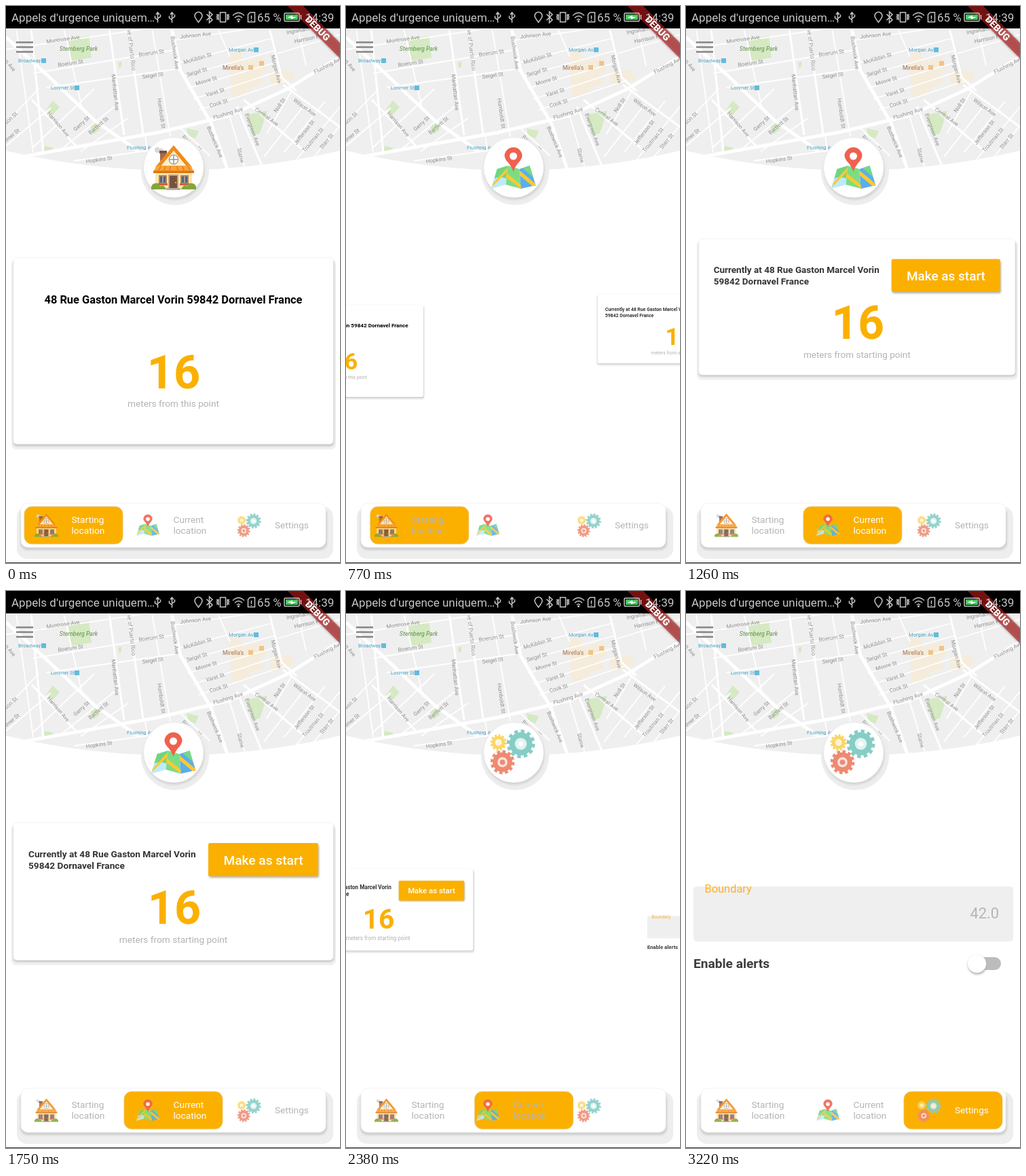
Recreate the animation shown at these times as an HTML page. Size 492 by 820 pixels, loop 3.29 s.

```html
<!DOCTYPE html>
<html lang="en">
<head>
<meta charset="utf-8">
<title>Distance tracker</title>
<style>
@property --page { syntax: "<number>"; inherits: true; initial-value: 0; }
@property --tab { syntax: "<number>"; inherits: true; initial-value: 0; }
@property --sel { syntax: "<number>"; inherits: true; initial-value: 0; }

html, body { margin: 0; width: 100%; height: 100%; overflow: hidden; background: #fff; }
svg.stage {
  display: block; width: 492px; height: 820px;
  font-family: Roboto, "Noto Sans", sans-serif;
  --amber: #fbb000;
  animation: page 3290ms infinite, tab 3290ms infinite, sel 3290ms step-end infinite;
}
@keyframes page {
  0% { --page: 0; }
  17.75% { --page: 0; animation-timing-function: cubic-bezier(.333, .9, .667, 1); }
  42.3% { --page: 1; }
  68.05% { --page: 1; animation-timing-function: cubic-bezier(.333, .9, .667, 1); }
  92.6%, 100% { --page: 2; }
}
@keyframes tab {
  0% { --tab: 0; }
  20.1% { --tab: 0; animation-timing-function: ease-in-out; }
  39.5% { --tab: 1; }
  67.95% { --tab: 1; animation-timing-function: ease-in-out; }
  87.4%, 100% { --tab: 2; }
}
@keyframes sel {
  0% { --sel: 0; }
  17.75% { --sel: 1; }
  68.05%, 100% { --sel: 2; }
}

/* Pages slide by a full width and shrink with their distance from the centre */
.page {
  --d: calc(var(--i) - var(--page));
  transform-origin: 246px 508px;
  transform: translateX(calc(var(--d) * 492px)) scale(max(0, 1 - max(var(--d), -1 * var(--d))));
}
.hero, .label {
  --s: calc(var(--i) - var(--sel));
  --on: max(0, 1 - max(var(--s), -1 * var(--s)));
}
.hero { opacity: var(--on); }
.label {
  --c: calc(180 + 75 * var(--on));
  fill: rgb(var(--c), var(--c), var(--c));
  font-size: 13.67px;
}
.pill { transform: translateX(calc(var(--tab) * 147px)); }

.amber { fill: var(--amber); }
.mid { text-anchor: middle; }
.bold { font-weight: 700; }
.big { font-size: 68.35px; font-weight: 700; fill: var(--amber); text-anchor: middle; }
.note { font-size: 13.67px; fill: #b2b2b2; text-anchor: middle; }
.icon { opacity: .87; }
.line { fill: none; stroke: #c6c6c6; stroke-width: 1.5; }
.road { fill: none; stroke: #fff; stroke-linejoin: round; }
#streets { font-size: 8px; fill: #8f8f8f; text-anchor: middle; }
.stop { font-size: 7.6px; fill: #45a3c4; }
</style>
</head>
<body>
<svg class="stage" viewBox="0 0 492 820">
  <defs>
    <filter id="soft" x="-10%" y="-10%" width="120%" height="130%"><feGaussianBlur stdDeviation="1.6"/></filter>
    <clipPath id="dome"><path d="M0 33H492V213Q246 271 0 213Z"/></clipPath>

    <symbol id="house" viewBox="0 0 66 66">
      <path d="M5 5q5-5 7 0q6-2 6 4q-3 5-8 2q-6 0-5-6" fill="#d5d8da"/>
      <path d="M13 9h9v20h-9z" fill="#a5694f"/>
      <path d="M12 8h11v4H12z" fill="#7d5240"/>
      <path d="M6 40h54v24H6z" fill="#fbe6ad"/>
      <path d="M33 3L55 32H11Z" fill="#fdf1cf"/>
      <path d="M33 0L60 32H53L33 8L13 32H6Z" fill="#f28a18"/>
      <circle cx="33" cy="21" r="7.5" fill="#c9a27d"/>
      <circle cx="33" cy="21" r="6" fill="#fff"/>
      <path d="M33 14v14M26 21h14" stroke="#8b9aa5" stroke-width="1.5"/>
      <path d="M8 30H58L63 39H3Z" fill="#f9a43a"/>
      <path d="M3 37.500H63V41H3Z" fill="#df7412"/>
      <path d="M14 31l-3 6m10-6l-2 6m9-6l-1 6m11-6l1 6m7-6l2 6m6-6l3 6" stroke="#e47e16" stroke-width="1.500"/>
      <path d="M25 43h15v22H25z" fill="#caa374"/>
      <path d="M27 45h11v20H27z" fill="#76533f"/>
      <circle cx="36" cy="55" r="1" fill="#f5cc62"/>
      <path d="M11 44h12v13H11zM43 44h12v13H43z" fill="#b98256"/>
      <path d="M13 46h8v9h-8zM45 46h8v9h-8z" fill="#536378"/>
      <path d="M17 46v9M49 46v9" stroke="#e9ddc1"/>
      <path d="M10 56h14v3H10zM42 56h14v3H42z" fill="#d65d41"/>
      <path d="M0 65q-1-8 6-9q5-1 7 4q6-3 9 5zM66 65q1-8-6-9q-5-1-7 4q-6-3-9 5z" fill="#83a637"/>
      <path d="M22 63h21v3H22z" fill="#b7aaa0"/>
    </symbol>

    <symbol id="place" viewBox="0 0 66 66">
      <path d="M9 33L25 28L22 56L0 62Z" fill="#bdeafd"/>
      <path d="M9 33L25 28L23 47Q13 43 5 47Z" fill="#71d57c"/>
      <path d="M25 28L42 33L44 62L22 56Z" fill="#7bdd83"/>
      <path d="M42 33L57 28L66 57L44 62Z" fill="#5aaeee"/>
      <path d="M47 32L57 28L62 45Z" fill="#75d97e"/>
      <path d="M23 39L44 56L44 62L22 45ZM42 35L66 55V58L61 58L42 42Z" fill="#fbc933"/>
      <path d="M3 54L25 30L24 37L2 59Z" fill="#fbc933"/>
      <path d="M33 37Q30 28 24 22Q18 15 21 9Q25 1 33 1T45 9Q48 15 42 22Q36 28 33 37Z" fill="#f0604f"/>
      <circle cx="33" cy="14" r="5.500" fill="#fff"/>
    </symbol>

    <g id="gear">
      <circle r="8.200" fill="currentColor"/>
      <circle r="8.900" fill="none" stroke="currentColor" stroke-width="2.400" pathLength="24" stroke-dasharray="1.100 .9"/>
      <circle r="4.200" fill="#fff" opacity=".75"/>
    </g>
    <symbol id="gears" viewBox="0 0 66 66">
      <g color="#86cdc6" transform="translate(44.500 21) scale(2.080)"><use href="#gear"/><circle r="1.800" fill="#fff"/></g>
      <g color="#fbd565" transform="translate(11.500 19) scale(1.200)"><use href="#gear"/></g>
      <g color="#ed8a72" transform="translate(17.500 48) scale(1.760)"><use href="#gear"/><circle r="2.200" fill="currentColor"/></g>
    </symbol>

    <path id="usb" d="M0 8V-6M-2.500-4L0-7L2.500-4M0 4L-4 1V-2M0 2L4-1V-4" class="line"/>
  </defs>

  <rect width="492" height="820" fill="#fff"/>

  <g clip-path="url(#dome)">
    <rect width="492" height="270" fill="#efefef"/>
    <g fill="#d5e9c2">
      <path d="M92 48L122 44L126 76L96 81ZM69 139L79 149L69 160L59 153Z"/>
      <path d="M124 177L132 171L138 182L129 189ZM165 83l5-1v8l-4 1zM266 180L284 184L279 195L268 191Z"/>
      <path d="M355 160L385 154L374 187L364 191ZM57 206l13 3l-8 9l-9-2z"/>
    </g>
    <path d="M328 70L345 66L360 128L333 135ZM348 83L378 74L385 95L355 105ZM388 97L420 94L426 108L391 120ZM340 108L375 99L380 114L345 124Z" fill="#f5ecdc"/>
    <g class="road" stroke-width="1.800">
      <path d="M0 64L250 27M40 99L252 64M60 120L256 92M250 50L492 14M252 84L390 48M262 103L395 66M268 121L398 83M276 137L405 95M284 153L412 110"/>
      <path d="M15 33L40 215M85 33L112 150M215 33L242 192M312 33L330 75M430 33L442 88M400 70L492 42"/>
      <path d="M0 172L48 122M0 206L66 150M40 208L130 122M80 212L160 148M110 214L180 165"/>
      <path d="M384 188L425 118M410 215L470 140M428 226L492 148M452 224L492 176M380 222L440 145"/>
      <path d="M255 178L300 220M328 158L352 238M100 228L215 212M205 190L212 240"/>
    </g>
    <g class="road" stroke-width="3">
      <path d="M37 33L55 216M152 33L174 190M180 33L202 188M388 33L406 105L428 125M340 148L378 238M350 138L440 214M408 116L492 178M38 138L105 208"/>
    </g>
    <g class="road" stroke-width="5">
      <path d="M0 46L62 103L130 168L195 214M244 33L257 95L302 172L326 240M0 226L225 186L330 161L415 122L492 74"/>
    </g>
    <g id="streets"></g>
    <g class="stop">
      <text x="18" y="83">Broadway</text><text x="66" y="123">Lorimer St</text>
      <text x="328" y="67">Morgan Av</text><text x="178" y="211">Flushing Av</text>
      <path d="M52 77h7v7h-7zM101 117h7v7h-7zM365 61h7v7h-7z" fill="#62bbdc"/>
    </g>
    <text x="107" y="66" class="mid" font-size="8.800" font-style="italic" fill="#5d8e45">Sternberg Park</text>
    <text x="319" y="94" font-size="8.600" fill="#a5744f">Mirella's</text>
    <path d="M357 87h7v7h-7zM373 81h7v7h-7z" fill="#efc489"/>
  </g>

  <path d="M15 53.500H40M15 60.500H40M15 67.500H40" stroke="#858585" stroke-width="2.600"/>

  <circle cx="249" cy="243" r="50" fill="#ededed"/>
  <circle cx="248" cy="241" r="44.500" fill="#d4d4d4" filter="url(#soft)"/>
  <circle cx="247" cy="238" r="44" fill="#fff"/>
  <use class="hero" style="--i:0" href="#house" x="214" y="205" width="66" height="66"/>
  <use class="hero" style="--i:1" href="#place" x="213.500" y="207" width="66" height="66"/>
  <use class="hero" style="--i:2" href="#gears" x="213" y="204" width="66" height="66"/>

  <g class="page" style="--i:0">
    <rect x="8" y="373" width="478" height="280" rx="7" fill="#f1f1f1"/>
    <rect x="11" y="374" width="472" height="274" rx="5" fill="#c4c4c4" filter="url(#soft)"/>
    <rect x="11" y="370.500" width="471" height="274.500" rx="5" fill="#fff" stroke="#eee" stroke-width=".7"/>
    <text x="246.500" y="437.500" class="mid bold" font-size="16.400">48 Rue Gaston Marcel Vorin 59842 Dornavel France</text>
    <text x="247" y="563" class="big">16</text>
    <text x="246.500" y="590" class="note">meters from this point</text>
  </g>

  <g class="page" style="--i:1">
    <rect x="8" y="344" width="478" height="207" rx="7" fill="#f1f1f1"/>
    <rect x="11" y="345" width="472" height="201" rx="5" fill="#c4c4c4" filter="url(#soft)"/>
    <rect x="11" y="341" width="471" height="202.500" rx="5" fill="#fff" stroke="#eee" stroke-width=".7"/>
    <g class="bold" font-size="13.670" fill="#333">
      <text x="33" y="392">Currently at 48 Rue Gaston Marcel Vorin</text>
      <text x="33" y="408.500">59842 Dornavel France</text>
    </g>
    <rect x="299" y="374" width="162" height="48" rx="3" fill="#b0b0b0" filter="url(#soft)"/>
    <rect x="298" y="371" width="162" height="49" rx="2.500" class="amber"/>
    <text x="379" y="403" class="mid" font-size="19.140" font-weight="500" fill="#fff">Make as start</text>
    <text x="248" y="490" class="big">16</text>
    <text x="246.500" y="518" class="note">meters from starting point</text>
  </g>

  <g class="page" style="--i:2">
    <rect x="11" y="435" width="471" height="81" rx="5" fill="#efefef"/>
    <text x="27.500" y="444" font-size="16.400" fill="#fbb22c">Boundary</text>
    <text x="461" y="482" font-size="21.870" fill="#b5b5b5" text-anchor="end">42.0</text>
    <text x="11" y="555" class="bold" font-size="19.140" fill="#3d3d3d">Enable alerts</text>
    <rect x="418" y="539" width="46" height="19" rx="9.500" fill="#bcbcbc"/>
    <circle cx="429" cy="550.500" r="14" fill="#b5b5b5" filter="url(#soft)"/>
    <circle cx="428.500" cy="548.500" r="13.600" fill="#fff"/>
  </g>

  <rect x="16" y="737" width="466" height="77" rx="15" fill="#eee"/>
  <rect x="21" y="738" width="452" height="63" rx="11" fill="#cfcfcf" filter="url(#soft)"/>
  <rect x="22" y="732" width="449" height="65" rx="10" fill="#fff" stroke="#eee" stroke-width=".7"/>
  <rect class="pill amber" x="27" y="737" width="145" height="55" rx="11" stroke="#e9c067" stroke-width=".8"/>
  <g class="icon">
    <use href="#house" x="42" y="747" width="35" height="35"/>
    <use href="#place" x="192" y="748" width="34" height="34"/>
    <use href="#gears" x="341" y="747" width="35" height="35"/>
  </g>
  <g class="label" style="--i:0"><text x="96.500" y="761">Starting</text><text x="96.500" y="777">location</text></g>
  <g class="label" style="--i:1"><text x="246.500" y="761">Current</text><text x="246.500" y="777">location</text></g>
  <g class="label" style="--i:2"><text x="396" y="769">Settings</text></g>
  <path d="M0 819.500H492" stroke="#444"/>

  <rect width="492" height="33" fill="#000"/>
  <g transform="translate(492 0) rotate(45) scale(1.367)">
    <rect x="-40" y="28" width="80" height="12" fill="#000" opacity=".3" filter="url(#soft)"/>
    <rect x="-40" y="28" width="80" height="12" fill="#b71c1c" opacity=".63"/>
    <text y="37.600" class="mid" font-size="10.200" font-weight="900" fill="#fff">DEBUG</text>
  </g>
  <g font-size="17" fill="#c6c6c6">
    <text x="8" y="23">Appels d'urgence uniquem…</text>
    <text x="370" y="22.500">65 %</text>
    <text x="441" y="23">14:39</text>
  </g>
  <use href="#usb" x="223.500" y="16.500"/>
  <use href="#usb" x="244.500" y="16.500"/>
  <g class="line">
    <path d="M283.500 24Q278 17 278 14.500A5.500 5.500 0 0 1 289 14.500Q289 17 283.500 24Z"/>
    <path d="M295.500 12L304 20.500L299.500 24.500V8.500L304 12.500L295.500 21"/>
    <path d="M315.500 9.500h8v14h-8zM313 12v9M310.500 12l1 2-1 2 1 2-1 2M326 12v9M328.500 12l-1 2 1 2-1 2 1 2"/>
    <path d="M334 14Q342.500 6 351 14M337 17.500Q342.500 12 348 17.500M340 20.500Q342.500 18 345 20.500"/>
    <path d="M359.500 9.500h7v14h-10v-11zM361.500 14v5M361.500 20.500v1.500"/>
    <rect x="410" y="10.500" width="22" height="12" rx="1.500"/>
    <path d="M434.500 13v7"/>
  </g>
  <circle cx="342.500" cy="22.500" r="1.500" fill="#c6c6c6"/>
  <rect x="412" y="12.500" width="18" height="8" fill="#46c95b"/>
  <path d="M414 17l8-3v2h6l-8 3.500v-2z" fill="#fff"/>
</svg>
<script>
// name, centre x, centre y, angle
const streets = [
  ["Montrose Ave", 84, 49, -8], ["Boerum St", 95, 84, -8], ["Boerum St", 214, 69, -8],
  ["Seigel St", 216, 102, -8], ["Seigel St", 281, 97, -16], ["McKibbin St", 282, 77, -16],
  ["Johnson Ave", 279, 43, -6], ["Moore St", 295, 110, -16], ["Varet St", 308, 127, -16],
  ["Cook St", 313, 143, -16], ["Flushing Ave", 327, 158, -17], ["Flushing Ave", 474, 87, -28],
  ["Manhattan Ave", 161, 127, 84], ["ve of Puerto Rico", 185, 65, 83], ["Bushwick Ave", 249, 69, 82],
  ["Humboldt St", 229, 158, 82], ["Harrison Ave", 77, 174, 50], ["Gerry St", 111, 173, -42],
  ["Bartlett St", 136, 176, -40], ["Hopkins St", 137, 226, -8], ["Beaver St", 274, 202, 37],
  ["Bushwick Ave", 308, 200, 67], ["Evergreen Ave", 363, 182, 70], ["Stanw", 346, 220, 76],
  ["Central Ave", 384, 163, 36], ["Morgan Ave", 398, 93, 76], ["Noll St", 403, 146, -55],
  ["Wilson Ave", 440, 149, 36], ["Jefferson St", 439, 186, -52], ["Troutman St", 452, 197, -50],
  ["Starr St", 472, 199, -50], ["Harrison Pl", 444, 48, -12], ["Ingraham", 430, 36, -10],
  ["on Ave", 5, 86, 50], ["son St", 7, 165, -42], ["imer St", 9, 190, -40]
];
const layer = document.getElementById("streets");
for (const [name, x, y, angle] of streets) {
  const label = document.createElementNS(layer.namespaceURI, "text");
  label.textContent = name;
  label.setAttribute("dy", ".35em");
  label.setAttribute("transform", `translate(${x} ${y}) rotate(${angle})`);
  layer.append(label);
}
</script>
</body>
</html>
```
